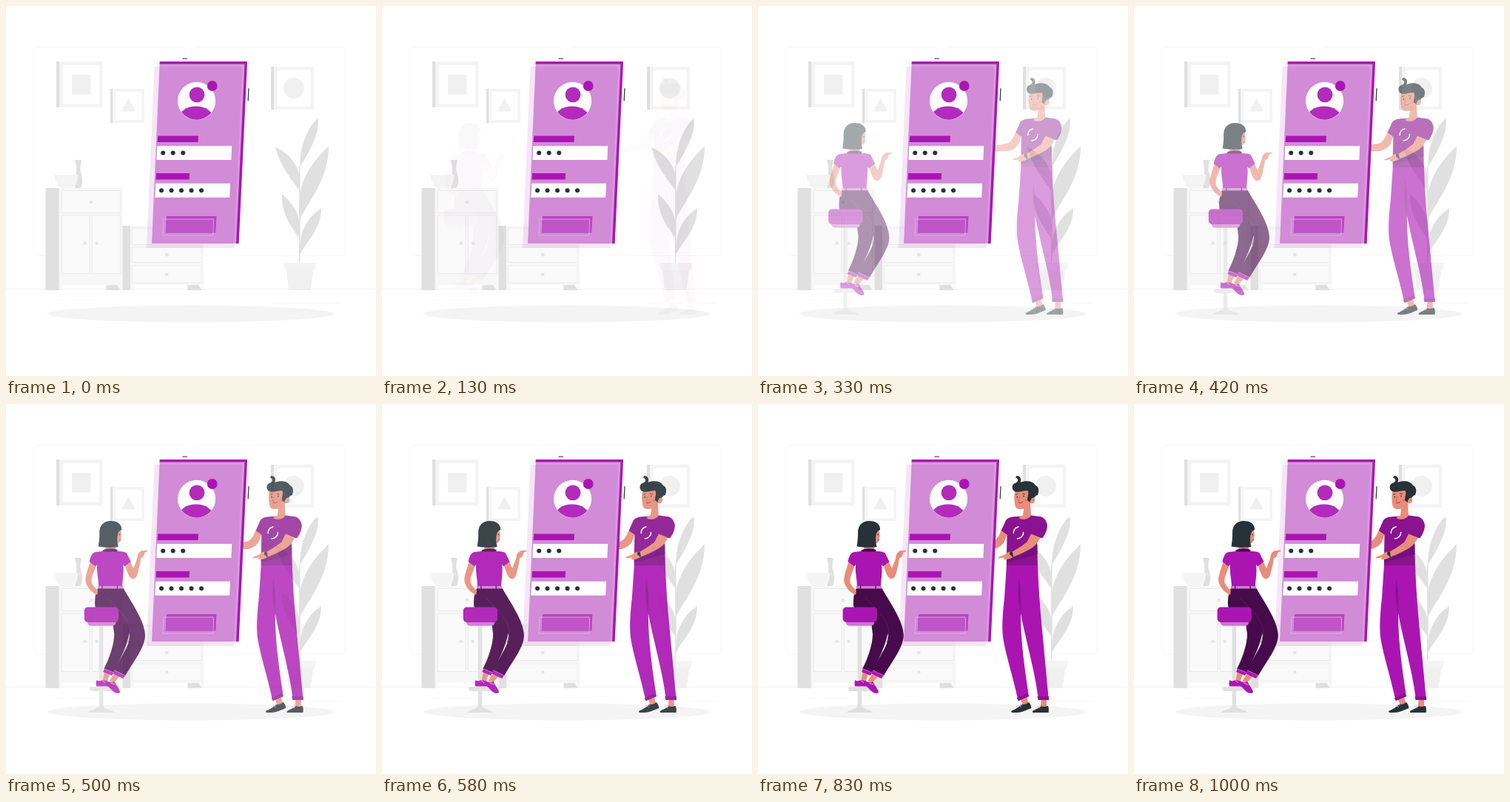
Animation, 500 px wide and 500 px high, one loop 1.04 s. Source, as an HTML page with a canvas:

```html
<!DOCTYPE html>
<html lang="en">
<head>
<meta charset="utf-8">
<title>Sign-in scene</title>
<style>
html, body { margin: 0; width: 100%; height: 100%; overflow: hidden; background: #fff; }
canvas { display: block; width: 500px; height: 500px; }
</style>
</head>
<body>
<canvas id="stage" width="500" height="500"></canvas>
<script>
const SIZE = 500, LOOP = 1040, SLIDE = 30;
const PURPLE = '#aa15b2', PLUM = '#8a138f', WINE = '#470a4b', INK = '#263238', SKIN = '#e78d7a';
const G1 = '#fafafa', G2 = '#f4f4f4', G3 = '#f0f0f0', G4 = '#e0e0e0';

const stage = document.getElementById('stage').getContext('2d');

function makeLayer() {
  const c = document.createElement('canvas');
  c.width = c.height = SIZE;
  return c.getContext('2d');
}
const room = makeLayer(), panel = makeLayer(), actor = makeLayer();
let g = room;

function fill(color, d) {
  g.fillStyle = color;
  g.fill(new Path2D(d));
}
function line(color, width, d) {
  g.strokeStyle = color;
  g.lineWidth = width;
  g.lineCap = 'round';
  g.stroke(new Path2D(d));
}
function box(color, x, y, x2, y2, r = 0) {
  g.fillStyle = color;
  g.beginPath();
  g.roundRect(x, y, x2 - x, y2 - y, r);
  g.fill();
}
function frame(color, width, x, y, x2, y2, r = 0) {
  g.strokeStyle = color;
  g.lineWidth = width;
  g.beginPath();
  g.roundRect(x, y, x2 - x, y2 - y, r);
  g.stroke();
}
function oval(color, x, y, rx, ry = rx) {
  g.fillStyle = color;
  g.beginPath();
  g.ellipse(x, y, rx, ry, 0, 0, 7);
  g.fill();
}

function picture(x, y, x2, y2, side, rim) {
  box(G4, x, y, x + side, y2);
  box(G2, x + side, y, x2, y2);
  box('#fff', x + side + rim, y + rim, x2 - rim, y2 - rim);
}
function door(x, y, x2, y2) {
  box(G1, x, y, x2, y2);
  frame('#e9e9e9', 0.8, x, y, x2, y2);
}
function cabinet(x, y, side, x2) {
  const front = x + side;
  box(G4, x, y, front, 384);
  box('#f7f7f7', front, y, x2, 377);
  box('#f7f7f7', front, 377, front + 5, 384);
  box('#f7f7f7', x2 - 4, 377, x2, 384);
  fill(G4, `M${x2 - 22} 377H${x2 - 7}L${x2 - 3} 384H${x2 - 22}Z`);
}

function drawRoom() {
  g = room;
  box('#fff', 0, 0, SIZE, SIZE);
  frame('#f6f6f6', 0.8, 38.4, 55.4, 242.6, 337.5, 5);
  frame('#f6f6f6', 0.8, 254.4, 55.4, 458.6, 337.5, 5);
  box('#f2f2f2', 0, 382, SIZE, 383);
  box('#f8f8f8', 65, 397.5, 80, 398.3);
  box('#f8f8f8', 84, 397.5, 125, 398.3);
  box('#f8f8f8', 360, 401.3, 453, 402.1);

  picture(68, 75, 130.5, 137, 4.5, 4.7);
  box(G3, 89, 93, 114, 119.5);
  picture(141, 112, 187, 158, 3, 3.8);
  fill(G3, 'M165.5 125L175 142.5H156Z');
  picture(358, 82, 416, 140, 4, 4.5);
  oval(G3, 388.7, 111, 14);

  fill(G4, 'M93 208H102C101 213 100 217 100.5 222C102 228 103.5 233 103 239C102.5 243 101 246 100 246H93C96 238 95 228 95 222C95.500 217 94 213 93 208Z');
  fill(G2, 'M66 228H97.500C97 237 94 244 89 246.500H75C69 244 66.500 236 66 228Z');

  cabinet(53.5, 246, 18.3, 157.5);
  door(75.5, 249.5, 154.5, 279.5);
  door(75.5, 283, 113, 361.5);
  door(116.5, 283, 154.5, 361.5);
  oval('#e6e6e6', 114.8, 265, 2.3);
  oval('#e6e6e6', 106.8, 320.7, 2.3);
  oval('#e6e6e6', 122.7, 320.7, 2.3);

  cabinet(157.5, 297, 10.5, 267.5);
  for (const [y, y2] of [[300, 322.5], [325.8, 346.5], [351, 374]]) {
    door(170.3, y, 264.3, y2);
    oval('#e6e6e6', 217.3, (y + y2) / 2, 2.3);
  }

  line(G4, 1.5, 'M397 216C396.500 260 397.500 300 396.500 348');
  fill(G4, 'M397.500 217C396 190 409 162 421.500 151.500C424 170 413 192 397.500 217Z');
  fill(G4, 'M364 191C377 195 396 213 397 233V250C386 234 371 218 364 191Z');
  fill(G4, 'M436 189.500C413 211 399 234 397 258V288C409 264 436 234 436 189.500Z');
  fill(G4, 'M373 254C387 266 397 281 397 297V315C386 298 372 283 373 254Z');
  fill(G4, 'M426 273C408 286 396 302 396.500 338C405 318 426 303 426 273Z');
  fill(G3, 'M379 356H415L411.500 384H382Z');
  fill(G2, 'M375 347H419L417 357.500H377Z');

  oval(G2, 249.5, 416, 193.7, 11.4);
}

function drawPanel() {
  g = panel;
  fill(PURPLE, 'M207.700 75H326L314.600 321H309L319 79H207.500Z');
  fill('#d79adb', 'M207.600 78.500H322.500L311 321H197Z');
  line('#7b3a85', 1.3, 'M239 71.200H244.500');
  line('#303039', 1.2, 'M327.900 111.500L327.200 128');
  fill('rgba(170,21,178,.11)', 'M200.500 82H319L308 327H190Z');

  oval('#fff', 257.6, 128.3, 25.6);
  g.save();
  g.beginPath();
  g.arc(257.6, 128.3, 25.4, 0, 7);
  g.clip();
  oval('#b32bbb', 256.8, 153, 24, 17.5);
  g.restore();
  oval('#b32bbb', 258, 119.8, 10.4);
  oval(PURPLE, 278.7, 108, 6.9);

  fill(PURPLE, 'M205.200 175.500H260L259.500 184H204.700Z');
  fill('#fff', 'M204.200 189H305.200L304.400 208H203.400Z');
  fill(PURPLE, 'M203 226H248L247.600 234.500H202.600Z');
  fill('#fff', 'M202.200 239.700H303L302.200 258.700H201.400Z');
  for (let i = 0; i < 3; i++) oval(INK, 212.2 + i * 13.5, 198.4, 3);
  for (let i = 0; i < 5; i++) oval(INK, 210 + i * 13.5, 249.2, 3);

  fill('#b944c1', 'M217 284H284.400L283.300 306.500H215.800Z');
  fill('#c154c8', 'M216.800 288H280.600L279.900 306.500H215.800Z');
  line('#e3b3e6', 0.8, 'M213.200 288H280.700L279.900 310H212.200Z');
}

function drawMan() {
  // far arm, tucked behind the panel
  fill(SKIN, 'M331 170C328 178 325 183 320 185.500L297 190V197L321 196C328 194 333 190 335 186L339 175Z');

  // legs and shoes
  fill(SKIN, 'M357 399L365 395L367.500 405L360 408Z');
  fill(SKIN, 'M384.500 399H392V409H384Z');
  fill(INK, 'M344 415C350 412.500 355 409.500 359 405.500C362 407 365 405 368 403C370 405 371.500 408 371.300 411C365 413.500 358 417 352 417H345Z');
  fill(INK, 'M373 415C377 412.500 382 411 385 408C388 410 391 408.500 394 408C395.200 411 395 414 394.700 417H373Z');
  line('#c9a3d6', 1, 'M354 407L357.500 409.500M356.500 405.500L359 407M380 409L383 410.500M382.500 407L385 408.500');
  fill(PURPLE, 'M338 217H380C381 247 383 275 386 305L394.500 396H380.500C376 360 364 320 357 283C357 320 362 355 367.500 391.500L353 398.500C347 370 337 340 333.500 318C331 302 333 280 335 262Z');
  fill(PLUM, 'M354.500 236C353 251 352.500 263 357 283C358 263 357 249 354.500 236Z');
  fill(PLUM, 'M351.800 397.500L366.500 390.500L368.500 395L354 401.200Z');
  fill(PLUM, 'M379.500 395H395L395.200 400H380.500Z');

  // shirt
  fill(PLUM, 'M355 152C346 152 340 153 337 157L330.800 171L338.500 176.500L337.800 218H380L379 181L386.500 181C391 176 393 168 393 164C392 157 388 152.500 382 152L371 150.500Z');
  fill('#760f7d', 'M347 207C358 204 369 198 379.500 190V203C367 207 353 210 338 214L338 209Z');
  line('#fff', 1.5, 'M347.300 174.500C347.500 170 350 166.800 354 166M360.600 173.500C361 178 357 181.500 352.500 182');

  // head
  fill(SKIN, 'M349.500 117L368 115L370 128C373 124.500 377 127 376.300 131C375.500 134 372 135 370 134L370.800 149C371 154 362 158.500 354 154L360 150.500L361.200 141.500C354 143 350 141 349.400 137C348 130 347.800 123 349.500 117Z');
  fill(INK, 'M351.500 97C356.500 97 358.500 101 356.500 106C364 102.500 374 104 377 110C382 112 382 118 380 123C377 123.500 376 126 375 127C372 126 370.500 129 369.500 133L366 130C366 125 368.500 121 366.500 117C360 117 352 120.500 348 117.500C344.500 114 345 109 349 107C354 106 355 101 350 99.500Z');
  oval(INK, 352.3, 125.8, 0.8, 1);
  oval(INK, 361, 124.6, 0.8, 1);
  line(INK, 0.8, 'M350.500 122.500L353 121.500M359.500 121L362.500 121.800');
  line('#c96352', 0.8, 'M355.500 126L353.700 131L355.500 131.200');
  line('#83302e', 0.8, 'M354.500 133.500C357 134.500 359 133.500 360 132');
  oval('#df7565', 364.3, 130, 2, 1.5);

  // pointing arm
  fill(SKIN, 'M371 175.500L383.500 180.500C380 188 376 192 372 194.500C364 199.500 355 203.500 347 206.500L343.800 200.500C352 196.500 361 190 365.500 186.500Z');
  fill(SKIN, 'M345.500 199.800C342 199 339 200.500 335.500 203.500L326.700 207L327 208.600L335.500 207.600L333.500 209.500C338 211.500 344 208.500 347 206.500Z');
  line(INK, 2.2, 'M343.600 200.300L346 205.500');
  oval(INK, 344.300, 202.200, 2.1, 2.600);
}

function drawWoman() {
  // stool stand
  box(G4, 132.6, 298, 138.2, 411);
  box(G4, 120, 382, 151, 388, 3);
  fill(G4, 'M117.500 417C120 413 131 413 132.600 408H138.200C139.500 413 151 413 153.500 417Z');

  // feet
  fill(SKIN, 'M139.500 362L147 365.500L143 376H137Z');
  fill(PURPLE, 'M129.500 373C132 375.500 134 374 137 373L144.500 374.500L148 381.500H129C128.300 378 128.300 375 129.500 373Z');
  fill(SKIN, 'M153 364L160.500 368L152 377.500L146.500 374Z');
  fill(PURPLE, 'M142.500 376C145 374.500 147 375.500 150 376.500L153.500 375C155 380 159.500 383.500 161 389C160 391.500 157 391.300 154 390C149.500 387.500 147 382.500 143.500 381Z');
  line('#f3d6f4', 0.8, 'M137 373.500L140.500 376.500M149 377.500L154 379');

  // trousers
  fill(WINE, 'M150 288L175 294C175 319 163 340 152.500 363L139 358C146 345 153 325 153 311Z');
  fill(WINE, 'M131 249H165.500C176 268 194.500 293 194.800 313C194.500 329 179 348 168 367L153 360.500C159 345 175 326 174 313C173 303 161 297 148 293L138 288C129 283 126 275 127 265C127.200 258 129 253 131 249Z');
  line('#5d2062', 0.8, 'M143 262C155 274 171 288 174.500 304C175 309 174.500 315 172 322');
  fill(PURPLE, 'M140 357.500L152.500 362.500L150 367L138 362Z');
  fill(PURPLE, 'M153.500 359.500L168 366.500L165 371L150.500 364Z');
  line('#cf75d4', 0.8, 'M140 358L152 363M153.500 360L167.500 366.800');

  // arms
  fill(SKIN, 'M120.500 213C117 225 113 234 114.500 241C117 249 123 255 130 258L131 252C126 248 122.300 243 122.300 239C122.500 232 127 225 128.500 218Z');
  fill(SKIN, 'M167.500 217.500C170 226 173 235 177 236C181 237 183.500 234 185 228C186.500 221 188.500 214 189 208C192.500 207.500 193.500 205 194 201.500C195 199.700 197 199.500 198.200 199.200L198 197.700L190 198.200C186.500 200 184 204 184.500 207C183 212 180.500 218 179 222C177.500 219 176 216 174 211Z');

  // blouse and belt
  fill(SKIN, 'M141 190H155V198H141Z');
  fill(PURPLE, 'M137 199H158C165 199 169 200 170 202L175.500 213L167 219.500L165 217C166.500 228 164 238 164 247H132C132 237 129 228 130 217L127.800 219.500L119.500 213C121 206 123 201 128 200Z');
  fill(WINE, 'M137 198.200C142 194.500 153 194.500 158 197.500L156.500 199.500H138.500Z');
  box('#cb80d0', 131, 246, 165, 249.6, 0.5);
  box(WINE, 136, 245.5, 137.2, 250);
  box(WINE, 156.5, 245.5, 157.7, 250);

  // head
  fill(SKIN, 'M154 170L161.500 169.500C162 174 163.300 177 162.300 180C162.300 185 160.500 188.500 155.500 188Z');
  fill(INK, 'M133 175C132.500 163 140 158 148 158C156 158 162 161 163 168C163.300 170.500 162 171 160 171.500C157 175 156 183 158.500 193C150 194.500 139 194 131.500 192.500C132.500 186 133.200 180 133 175Z');
  oval(INK, 160.2, 176.5, 0.7, 1);
  line('#83302e', 0.7, 'M160 184L161.700 183.500');

  // seat
  fill('#c978ce', 'M116.500 294H155.500C155 298 153.500 299.700 151 299.700H121C118.500 299.700 117 298 116.500 294Z');
  box(PURPLE, 112.6, 274.4, 158.9, 295, 5);
}

// progress keys: [tick, value]; eased with a smooth spline, overshooting before it rests
const KEYS = [[2, 0], [6, .24], [8, .42], [12, .775], [16, 1], [20, 1.067], [24, 1]];

function slope(i) {
  const a = KEYS[i - 1], b = KEYS[i + 1];
  return a && b ? (b[1] - a[1]) / (b[0] - a[0]) : 0;
}
function progress(tick) {
  if (tick <= KEYS[0][0]) return 0;
  const i = KEYS.findIndex(k => k[0] >= tick) - 1;
  const [t0, v0] = KEYS[i], [t1, v1] = KEYS[i + 1];
  const h = t1 - t0, s = (tick - t0) / h, s2 = s * s, s3 = s2 * s;
  return v0 + (v1 - v0) * (3 * s2 - 2 * s3)
    + h * (slope(i) * (s3 - 2 * s2 + s) + slope(i + 1) * (s3 - s2));
}

// 24 ticks per second, starting on whole hundredths
const tickStart = k => Math.round(k * 25 / 6) * 10;
function tickAt(ms) {
  let k = 24;
  while (k > 0 && tickStart(k) > ms) k--;
  return k;
}

function place(draw, dx, alpha) {
  g = actor;
  g.clearRect(0, 0, SIZE, SIZE);
  g.save();
  g.translate(dx, 0);
  draw();
  g.restore();
  stage.globalAlpha = alpha;
  stage.drawImage(actor.canvas, 0, 0);
  stage.globalAlpha = 1;
}

function render(now) {
  const p = progress(tickAt((now - start) % LOOP));
  const dx = SLIDE * (1 - p), alpha = Math.min(1, p);
  stage.drawImage(room.canvas, 0, 0);
  if (alpha > 0) place(drawMan, dx, alpha);
  stage.drawImage(panel.canvas, 0, 0);
  if (alpha > 0) place(drawWoman, -dx, alpha);
}
function loop() {
  render(performance.now());
  requestAnimationFrame(loop);
}

drawRoom();
drawPanel();
const start = performance.now();
loop();
</script>
</body>
</html>
```
